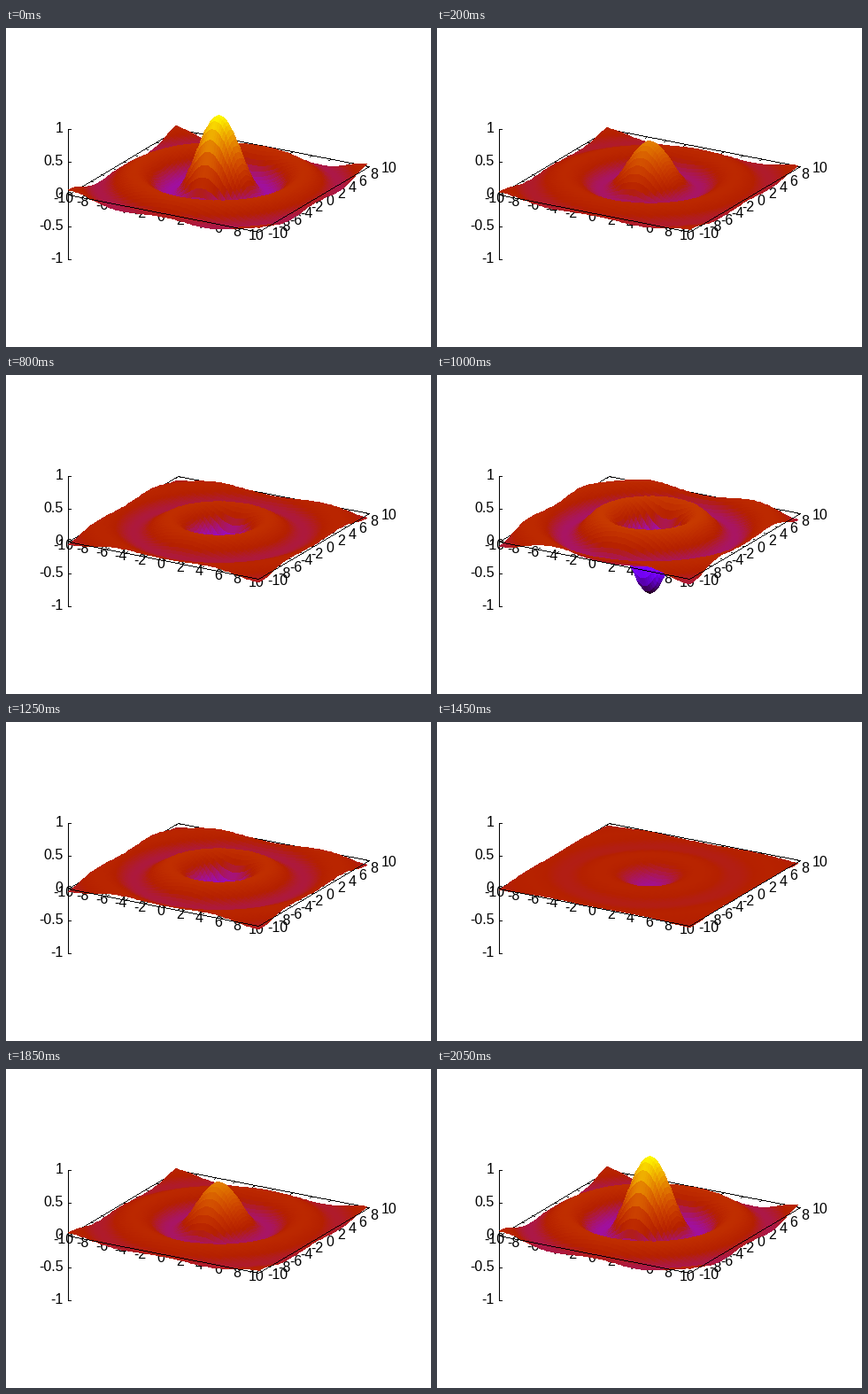
Write a matplotlib script that moves like this. It is 480x360 px and loops after 2.1 s.

```python
import numpy as np
import matplotlib.pyplot as plt
from matplotlib.animation import FuncAnimation
from matplotlib.collections import PolyCollection

W, H, DPI = 480, 360, 100
STEPS = 21                      # amplitudes from 1 down to -1, then back
CENTER = np.array([239.9, 172.0])
TURN = np.radians(30)
SX, SY, SZ = 12.43, 4.246, 73.5
TICK = 3
PIXEL = 0.4 * np.array([[-1, -1], [1, -1], [1, 1], [-1, 1]])
BACK, SURFACE, FRONT = 1, 2, 3


def project(x, y, z=0.0):
    """Orthographic view, tilted 60 degrees and turned 30."""
    u = CENTER[0] + SX * (x * np.cos(TURN) + y * np.sin(TURN)) + 0 * z
    v = CENTER[1] + SY * (x * np.sin(TURN) - y * np.cos(TURN)) - SZ * z
    return np.stack(np.broadcast_arrays(u, v), axis=-1)


def palette(z):
    g = np.clip((z + 1) / 2, 0, 1)
    blue = np.clip(np.sin(2 * np.pi * g), 0, 1)
    return np.stack([np.sqrt(g), g ** 3, blue], axis=-1)


fig = plt.figure(figsize=(W / DPI, H / DPI), dpi=DPI, facecolor="white")
ax = fig.add_axes([0, 0, 1, 1])
ax.set_xlim(-0.5, W - 0.5)
ax.set_ylim(H - 0.5, -0.5)
ax.axis("off")


def polygons(verts, color, layer):
    c = PolyCollection(verts, facecolors=color, edgecolors="none",
                       linewidths=0, antialiaseds=False, zorder=layer)
    ax.add_collection(c, autolim=False)
    return c


def line(p, q, layer=BACK):
    """Hard line, one pixel wide."""
    p, q = np.round(p), np.round(q)
    n = int(np.abs(q - p).max()) + 1
    dots = np.round(np.linspace(p, q, n))
    polygons(dots[:, None] + PIXEL, "black", layer)


def tick(p, toward):
    d = np.asarray(toward) - p
    line(p, p + TICK * d / np.hypot(*d))


def label(value, x, y, ha):
    ax.text(x, y, f"{value:g}", ha=ha, va="baseline", color="black",
            family="Liberation Sans", size=16 * 72 / DPI, zorder=BACK)


def draw_box():
    left, near = project(-10, -10), project(10, -10)
    right, far = project(10, 10), project(-10, 10)
    line(left, far)
    line(far, right)
    line(left, near, FRONT)
    line(near, right, FRONT)
    line(project(-10, -10, -1), project(-10, -10, 1))

    for t in range(-10, 11, 2):
        pad = 0 if t < 0 else 4.4      # room kept for the sign
        a, b = project(t, -10), project(t, 10)
        tick(a, b)
        tick(b, a)
        label(t, a[0] - 5.5 + pad / 2, a[1] + 8.5, "center")
        a, b = project(10, t), project(-10, t)
        tick(a, b)
        tick(b, a)
        label(t, a[0] + 9 + pad, a[1] + 6, "left")

    for t in np.linspace(-1, 1, 5):
        p = project(-10, -10, t)
        tick(p, p + [1, 0])
        label(t, p[0] - 6, p[1] + 3.7, "right")


draw_box()

# Rows run from the far edge to the near one, so later quads cover earlier ones.
gx, gy = np.meshgrid(np.linspace(-10, 10, 100), np.linspace(10, -10, 50)[1:])
ripple = np.sinc(np.hypot(gx, gy) / np.pi)
surface = polygons([], "none", SURFACE)


def corners(a):
    return a[:-1, :-1], a[:-1, 1:], a[1:, 1:], a[1:, :-1]


def update(i):
    k = min(i, 2 * STEPS - 1 - i)
    z = (1 - 2 * k / (STEPS - 1)) * ripple
    points = np.round(project(gx, gy, z))
    quads = np.stack(corners(points), axis=2)
    surface.set_verts(quads.reshape(-1, 4, 2))
    surface.set_facecolor(palette(sum(corners(z)) / 4).reshape(-1, 3))
    return (surface,)


anim = FuncAnimation(fig, update, frames=2 * STEPS, interval=50,
                     repeat=True, repeat_delay=0, blit=False)
plt.show()
```
